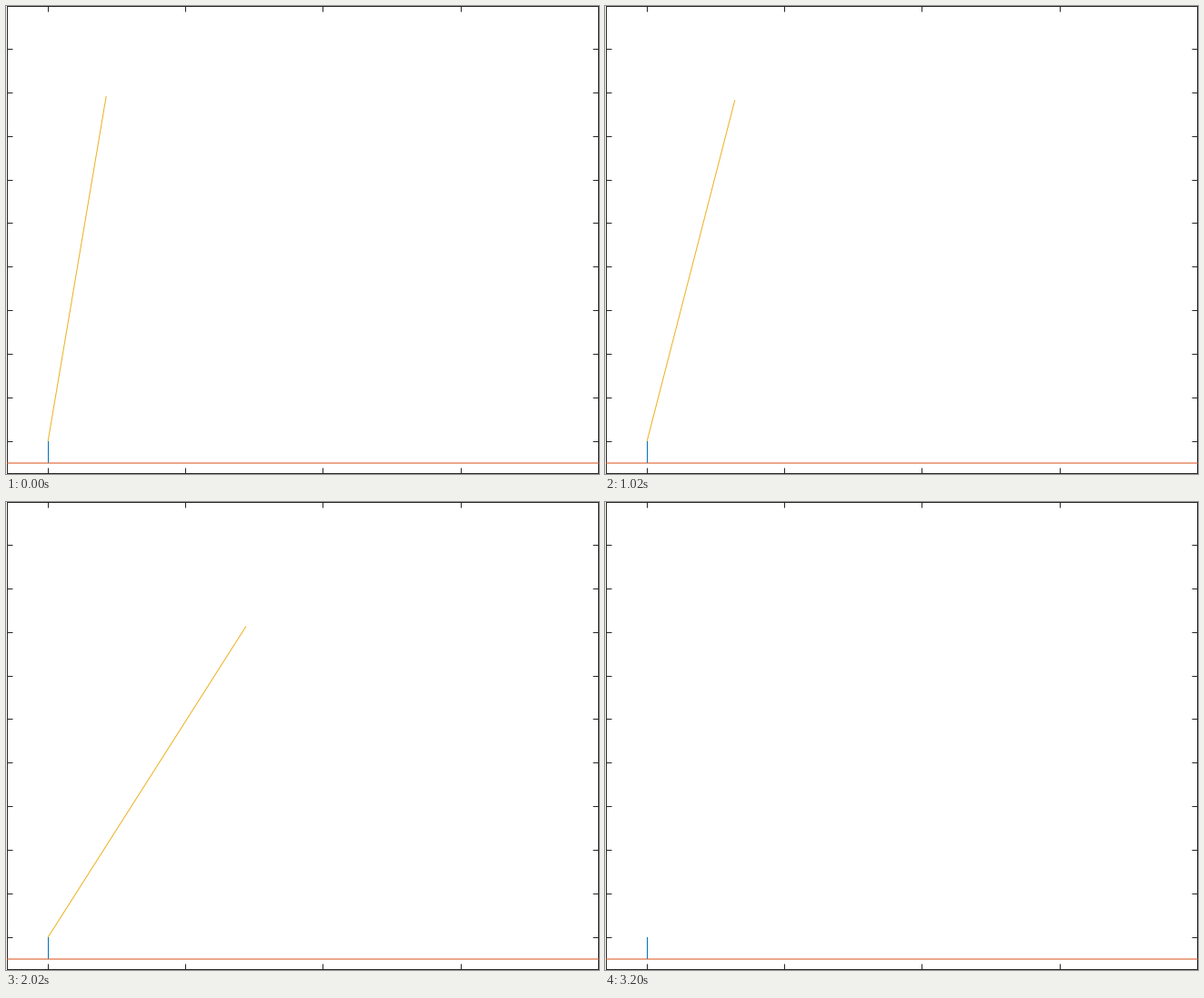
A matplotlib script that plays this animation: 652x514 px, repeating every 3220 ms.

```python
import numpy as np
import matplotlib.pyplot as plt
from matplotlib.animation import FuncAnimation
from matplotlib.collections import LineCollection

W, H, DPI = 652, 514, 64
PX = 72 / DPI                       # one pixel in points
DT, FRAMES = 0.02, 161

BLUE = (0, 0.447, 0.741)
ORANGE = (0.85, 0.325, 0.098)
YELLOW = (0.929, 0.694, 0.125)
INK = (0.15, 0.15, 0.15)

# World: a 16 m trunk hinged on a 1 m stump, with unequal axis scales
LENGTH, G = 16, 9.81
UX, UY = 30.27, 23.9
HINGE = np.array([46.2, 478.0])
GROUND = 502.0
SPAN_X, SPAN_Y = LENGTH * UX, LENGTH * UY

START_ANGLE = 0.1325
BREAK = 122                         # hinge gives way; this pose is held one step
FREE_SPIN = 0.677
KICK = np.array([-14.0, 5.0])       # velocity of the butt at the break, px/s


def hinged_angles(steps):
    """Angles from the vertical of a rod tipping about its lower end."""
    k2 = 1.5 * G / LENGTH
    angle, spin = START_ANGLE, 0.0
    out = [angle]
    for _ in range(steps):
        acc = k2 * np.sin(angle)
        angle += spin * DT + acc * DT**2 / 2
        spin += (acc + k2 * np.sin(angle)) * DT / 2
        out.append(angle)
    return out


def half(angle):
    return np.array([SPAN_X * np.sin(angle), -SPAN_Y * np.cos(angle)]) / 2


ANGLES = hinged_angles(BREAK)
BREAK_ANGLE = ANGLES[-1]


def free_pose(t):
    """Butt position and angle in free flight, t seconds after the break."""
    angle = BREAK_ANGLE + FREE_SPIN * t
    swing = FREE_SPIN / 2 * np.array([SPAN_X * np.cos(BREAK_ANGLE),
                                      SPAN_Y * np.sin(BREAK_ANGLE)])
    centre = HINGE + half(BREAK_ANGLE) + (swing + KICK) * t
    centre[1] += G * UY * t**2 / 2
    return centre - half(angle), angle


LAND = BREAK + 1
while free_pose((LAND - BREAK - 1) * DT)[0][1] < GROUND - 0.5:
    LAND += 1
LAND_BUTT, LAND_ANGLE = free_pose((LAND - BREAK - 1) * DT)


def pose(i):
    if i <= BREAK:
        return HINGE, ANGLES[i]
    if i < LAND:
        return free_pose((i - BREAK - 1) * DT)
    u = (i - LAND) / (FRAMES - 1 - LAND)
    angle = LAND_ANGLE + (np.pi / 2 - LAND_ANGLE) * (0.85 * u + 0.15 * u * u)
    x = LAND_BUTT[0] + (46.9 - LAND_BUTT[0]) * u
    return np.array([x, GROUND - 0.5]), angle


fig = plt.figure(figsize=(W / DPI, H / DPI), dpi=DPI, facecolor="white")
ax = fig.add_axes([0, 0, 1, 1])
ax.set(xlim=(0, W), ylim=(H, 0))
ax.axis("off")


def line(xs, ys, color, z):
    return ax.plot(xs, ys, color=color, lw=PX, zorder=z, snap=False,
                   solid_capstyle="butt")[0]


L, R, T, B, TICK = 1.5, 651.5, 0.5, 513.5, 6
segs = [[(L - .5, T), (R + .5, T)], [(L - .5, B), (R + .5, B)],
        [(L, T), (L, B)], [(R, T), (R, B)]]
for k in range(4):
    x = int(46.2 + 151.35 * k) + 0.5
    segs += [[(x, T), (x, T + TICK)], [(x, B), (x, B - TICK)]]
for k in range(10):
    y = int(47.5 + 47.86 * k) + 0.5
    segs += [[(L, y), (L + TICK, y)], [(R, y), (R - TICK, y)]]
ax.add_collection(LineCollection(segs, colors=[INK], linewidths=PX,
                                 capstyle="butt", snap=False, zorder=1))

line([46.5, 46.5], [478, GROUND], BLUE, 2)
line([1, W], [GROUND, GROUND], ORANGE, 3)
trunk = line([], [], YELLOW, 4)


def update(i):
    butt, angle = pose(i)
    tip = butt + 2 * half(angle)
    trunk.set_data([butt[0], tip[0]], [butt[1], tip[1]])
    trunk.set_visible(i < FRAMES - 1)   # lies flat, hidden by the ground
    return trunk,


anim = FuncAnimation(fig, update, frames=FRAMES, interval=1000 * DT,
                     repeat=True, repeat_delay=0, blit=False)
plt.show()
```
